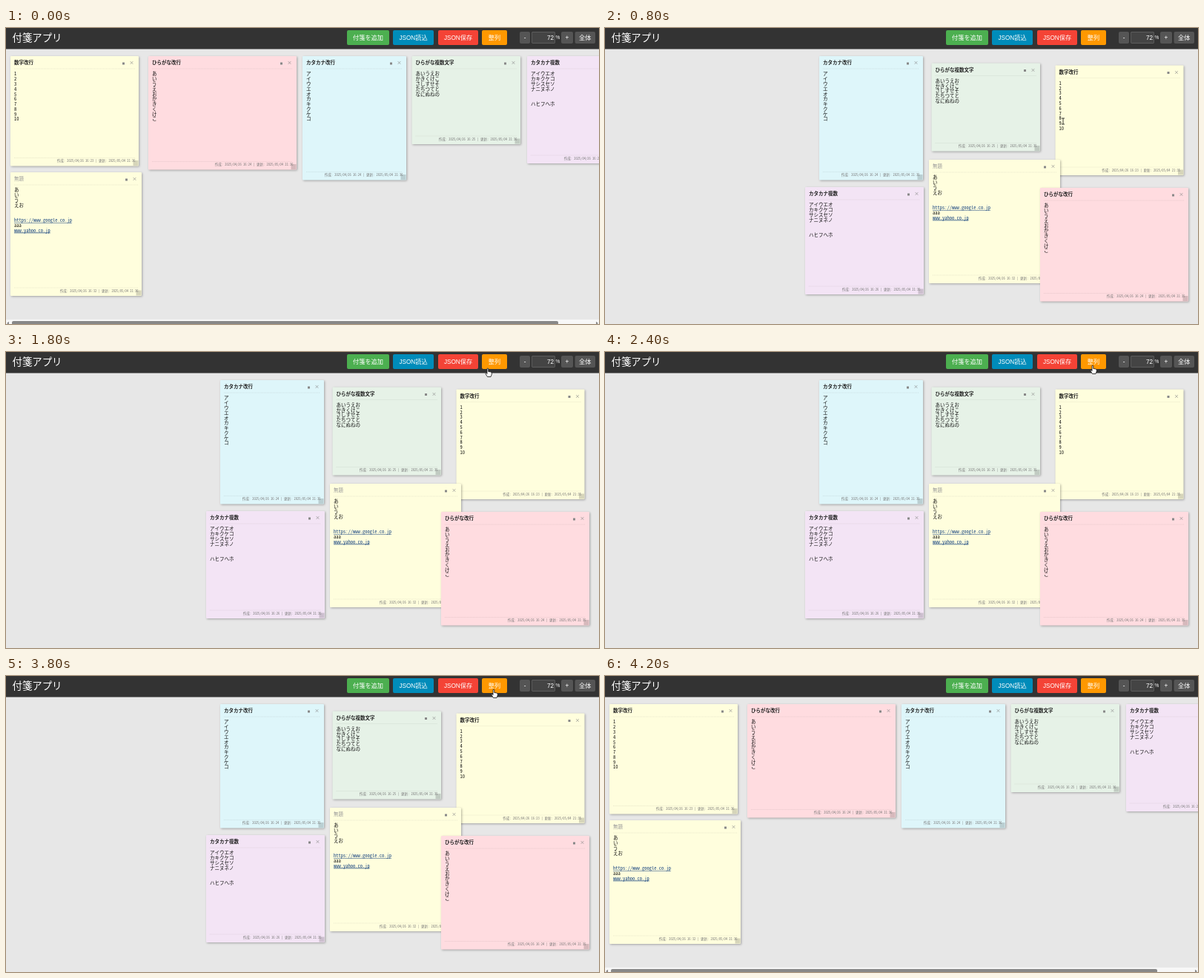
These frames come from a looping animation (800x400 px, 5000 ms). An HTML page with a canvas:

```html
<!DOCTYPE html>
<html lang="ja">
<head>
<meta charset="utf-8">
<title>付箋アプリ</title>
<style>
html, body { margin: 0; width: 100%; height: 100%; overflow: hidden; background: #e7e7e7; }
canvas { display: block; }
</style>
</head>
<body>
<canvas id="stage" width="800" height="400"></canvas>
<script>
const ctx = document.getElementById('stage').getContext('2d');
const MONO = '"Noto Sans Mono CJK JP", "Noto Sans CJK JP", monospace';
const SANS = '"Liberation Sans", "Noto Sans CJK JP", sans-serif';
const LOOP = 5000, STEP = 200, LINE = 6.78;

// Drawing order; home = tidy position, loose = scattered position.
const notes = [
  { title: 'カタカナ改行', color: '#def6fa', w: 140, h: 167.5, home: [400, 38], loose: [289, 38],
    made: '16:24', lines: [...'アイウエオカキクケコ'] },
  { title: 'ひらがな複数文字', color: '#e6f2e7', w: 146.5, h: 119, home: [547.5, 38], loose: [440.5, 47.5],
    made: '16:25', lines: ['あいうえお', 'かきくけこ', 'さしすせそ', 'たちつてと', 'なにぬねの'] },
  { title: '数字改行', color: '#fffedd', w: 173, h: 148.5, home: [6, 38], loose: [607.5, 50.5],
    made: '16:23', lines: Array.from({ length: 10 }, (_, i) => String(i + 1)) },
  { title: 'カタカナ複数', color: '#f3e4f5', w: 160, h: 145, home: [703, 38], loose: [270, 215],
    made: '16:26', lines: ['アイウエオ', 'カキクケコ', 'サシスセソ', 'ナニヌネノ', '', '', 'ハヒフヘホ'] },
  { title: '', color: '#fffedd', w: 177, h: 167, home: [6, 195], loose: [437, 178],
    made: '16:32', lines: ['あ', 'い', 'う', 'えお', '', '', 'https://www.google.co.jp', 'aaa', 'www.yahoo.co.jp'] },
  { title: 'ひらがな改行', color: '#ffdce0', w: 200, h: 153.5, home: [192, 38], loose: [587, 216],
    made: '16:24', lines: [...'あいうえおかきくけこ'] },
];

const buttons = [
  ['付箋を追加', 460, 57, '#4caf50'],
  ['JSON読込', 522, 55, '#008cba'],
  ['JSON保存', 583, 54, '#f44336'],
  ['整列', 642, 34, '#ff9800'],
];

// Mouse path: time, x, y
const path = [[200, 598, 174], [800, 618, 126], [1800, 651, 28], [2400, 659, 24], [LOOP, 659, 24]];
const grabHand = new Path2D('M-2.5 0V-2.5q.8-1 1.5-.3q1-1.6 1.8 0q1-1 1.6.3q1.2-.5 1.4.7V2L2.5 4.5H-1.5L-4 1.2q0-1.3 1.5-.2Z');
const pointHand = new Path2D('M-2-5.5q1-1 1.8 0V-1.5q3 0 4.5 1.2V2L3 5.5H-1.5L-4 1.5q0-1.2 1.2-.8L-2 1.5Z');
const iBeam = new Path2D('M-2-4H2M0-4V4M-2 4H2');

function text(str, x, midY, size, color, { font = MONO, weight = '', align = 'left' } = {}) {
  ctx.font = `${weight} ${size}px ${font}`;
  ctx.textAlign = align;
  ctx.fillStyle = color;
  ctx.fillText(str, x, midY + size * 0.37);
}

function box(x, y, w, h, color, radius = 0) {
  ctx.fillStyle = color;
  ctx.beginPath();
  ctx.roundRect(x, y, w, h, radius);
  ctx.fill();
}

function dottedLine(x1, x2, y) {
  ctx.strokeStyle = 'rgba(0,0,0,.13)';
  ctx.lineWidth = 0.7;
  ctx.setLineDash([1, 1]);
  ctx.beginPath();
  ctx.moveTo(x1, y);
  ctx.lineTo(x2, y);
  ctx.stroke();
  ctx.setLineDash([]);
}

function drawNote({ title, color, w, h, home, loose, made, lines }, tidy) {
  ctx.save();
  ctx.translate(...(tidy ? home : loose));
  ctx.shadowColor = 'rgba(0,0,0,.3)';
  ctx.shadowBlur = 3;
  ctx.shadowOffsetX = ctx.shadowOffsetY = 1;
  box(0, 0, w, h, color, 1);
  ctx.shadowColor = 'transparent';

  if (title) text(title, 5, 9, 6.5, '#222', { weight: 'bold' });
  else text('無題', 5, 9, 6.5, '#999');
  box(w - 22, 8.5, 3, 3, '#888');
  text('×', w - 9.5, 9, 6.5, '#888', { align: 'center' });
  dottedLine(5, w - 5, 17);

  lines.forEach((line, i) => {
    const y = 24 + i * LINE, link = line.includes('www');
    text(line, 5, y, 6.5, link ? '#16437f' : '#111');
    if (link) box(5, y + 3.2, line.length * 3.25, 0.7, '#16437f');
  });

  dottedLine(5, w - 5, h - 11);
  box(w - 7.5, h - 7.5, 7, 7, 'rgba(0,0,0,.16)');
  text(`作成: 2025/04/26 ${made} | 更新: 2025/05/04 21:${tidy ? 36 : 35}`,
    w - 4.5, h - 7, 4.5, '#777', { align: 'right' });
  ctx.restore();
}

function drawToolbar() {
  const label = { font: SANS, align: 'center' };
  box(0, 0, 800, 28.5, '#333');
  text('付箋アプリ', 8.5, 13, 13.4, '#fff', { font: SANS });
  for (const [name, x, w, color] of buttons) {
    box(x, 3, w, 20, color, 2);
    text(name, x + w / 2, 13, 8.2, '#fff', label);
  }
  for (const [name, x, w] of [['-', 693, 14], ['+', 749, 16], ['全体', 767.5, 27.5]]) {
    box(x, 5, w, 16, '#555', 2);
    text(name, x + w / 2, 13, 8.2, '#fff', label);
  }
  box(709, 5, 32, 16, '#666', 2);
  box(709.7, 5.7, 30.6, 14.6, '#444', 1.5);
  text('72', 739, 13, 8.2, '#fff', { font: SANS, align: 'right' });
  text('%', 744.5, 13, 6.5, '#fff', label);
}

function drawScrollbar() {
  box(0, 394, 800, 6, '#f7f7f7');
  box(8, 396, 737, 5, '#888', 2);
  ctx.fill(new Path2D('M1 399L4 396.8V401ZM799 399L796 396.8V401Z'));
}

function drawMouse(t) {
  const i = path.findIndex(p => p[0] > t);
  const [t0, x0, y0] = path[i - 1], [t1, x1, y1] = path[i];
  const k = (t - t0) / (t1 - t0);
  const x = x0 + (x1 - x0) * k, y = y0 + (y1 - y0) * k;
  ctx.save();
  ctx.translate(x, y);
  ctx.strokeStyle = '#111';
  ctx.lineWidth = 0.8;
  if (x > 607 && y > 51) {
    ctx.stroke(iBeam);
  } else {
    const hand = y < 30 ? pointHand : grabHand;
    ctx.fillStyle = '#fff';
    ctx.fill(hand);
    ctx.stroke(hand);
  }
  ctx.restore();
}

function draw(now) {
  const t = Math.floor((now % LOOP) / STEP) * STEP;
  const tidy = t < 200 || t >= 4000;
  box(0, 0, 800, 400, '#e7e7e7');
  notes.forEach(note => drawNote(note, tidy));
  if (tidy) drawScrollbar();
  drawToolbar();
  if (t >= 200 && t < 4200) drawMouse(t);
}

const start = performance.now();
function tick() {
  draw(performance.now() - start);
  requestAnimationFrame(tick);
}
tick();
</script>
</body>
</html>
```
